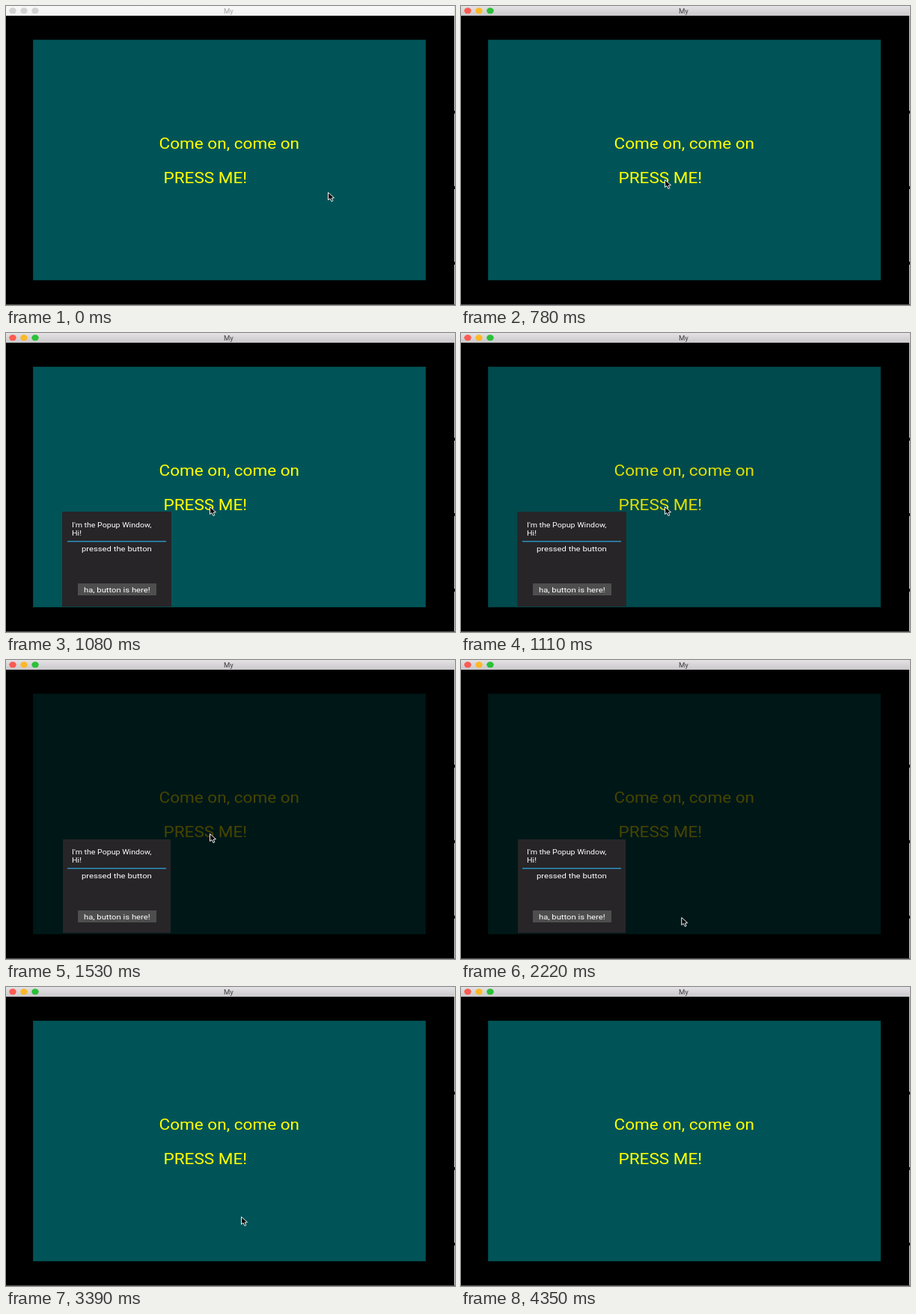
Recreate the animation shown at these times as an HTML page with a canvas. Size 600 by 400 pixels, loop 4.53 s.

```html
<!DOCTYPE html>
<html>
<head>
<meta charset="utf-8">
<title>Popup demo</title>
<style>
  html, body { margin: 0; width: 100%; height: 100%; overflow: hidden; background: #000; }
  canvas { display: block; }
</style>
</head>
<body>
<canvas id="stage" width="600" height="400"></canvas>
<script>
const ctx = document.getElementById('stage').getContext('2d');
const LOOP = 4530, TICK = 30;
const FOCUS = 90, OPEN = 1080, CLOSE = 3330, CLOSED = 3390, HIDE = 4350;
const FADE_IN = 180, FADE_OUT = CLOSED - CLOSE;
const WIDEN = 1.14; // the window is shown wider than it is tall

const START = { x: 430, y: 249 };
const MOVES = [
  { from: 30, to: 780, x: 272, y: 232 },   // onto the big button
  { from: 1530, to: 2040, x: 329, y: 343 },
  { from: 2100, to: 2460, x: 195, y: 347 }, // onto the popup's button
  { from: 3030, to: 3180, x: 314, y: 307 },
  { from: 3630, to: 3780, x: 380, y: 224 },
  { from: 3930, to: 4320, x: 475, y: 14 }
];
const ARROW = new Path2D('M0 0V10L2.5 8L4.5 12L6.3 11.2L4.7 7.5L8 7.2Z');

const clamp = v => Math.max(0, Math.min(1, v));
const lerp = (a, b, k) => a + (b - a) * k;
const ease = u => u * u * (3 - 2 * u);

function rect(x, y, w, h, color) {
  ctx.fillStyle = color;
  ctx.fillRect(x, y, w, h);
}

function text(str, x, y, size, color) {
  ctx.save();
  ctx.translate(x, y);
  ctx.scale(WIDEN, 1);
  ctx.font = `${size}px Roboto, sans-serif`;
  ctx.fillStyle = color;
  ctx.fillText(str, 0, 0);
  ctx.restore();
}

function titleBar(active) {
  const shade = ctx.createLinearGradient(0, 0, 0, 13);
  shade.addColorStop(0, active ? '#e4e2e4' : '#f8f8f8');
  shade.addColorStop(1, active ? '#cac8ca' : '#f2f2f2');
  rect(0, 0, 599, 13, shade);
  ['#fc5b51', '#fcb827', '#2ac138'].forEach((color, i) => {
    ctx.fillStyle = active ? color : '#d2d2d2';
    ctx.beginPath();
    ctx.ellipse(9 + 15 * i, 6.3, 4.7, 4, 0, 0, 7);
    ctx.fill();
  });
  text('My', 291, 10, 8.4, active ? '#444' : '#a8a8a8');
}

function desktopEdge() {
  rect(599, 0, 1, 400, '#dcdcdc');
  for (let y = 140; y < 400; y += 101) rect(599, y, 1, 4, '#222');
  rect(0, 399, 600, 1, '#555');
}

function panel(dim) {
  const light = 1 - 0.73 * dim;
  const shaded = (...rgb) => `rgb(${rgb.map(v => Math.round(v * light))})`;
  rect(36, 45, 525, 322, shaded(0, 70, 72));
  rect(37, 46, 523, 320, shaded(0, 84, 88));
  text('Come on, come on', 204.5, 190.6, 19.8, shaded(255, 255, 0));
  text('PRESS ME!', 210.5, 236.6, 19.8, shaded(255, 255, 0));
}

function popup(dim, pressed) {
  const grow = 1 - dim;
  rect(76 - grow, 240 - grow, 144 + 2 * grow, 125 + 2 * grow, '#272528');
  text("I'm the Popup Window,", 88, 260, 9.3, '#fff');
  text('Hi!', 88, 271, 9.3, '#fff');
  rect(82, 278, 132, 1.5, '#2f8fc0');
  text('pressed the button', 101, 292, 9.9, '#fff');
  rect(96, 335, 105, 16, pressed ? '#2f8fb4' : '#4e4e4e');
  text('ha, button is here!', 104, 347, 9.9, '#fff');
}

function cursor(t) {
  let { x, y } = START;
  for (const move of MOVES) {
    const k = ease(clamp((t - move.from) / (move.to - move.from)));
    x = lerp(x, move.x, k);
    y = lerp(y, move.y, k);
  }
  ctx.save();
  ctx.translate(x + 0.5, y + 0.5);
  ctx.fillStyle = '#080808';
  ctx.fill(ARROW);
  ctx.strokeStyle = '#f4f4f4';
  ctx.stroke(ARROW);
  ctx.restore();
}

function draw(t) {
  const dim = clamp((t - OPEN) / FADE_IN) * clamp((CLOSED - t) / FADE_OUT);
  rect(0, 0, 600, 400, '#000');
  titleBar(t >= FOCUS);
  desktopEdge();
  panel(dim);
  if (t >= OPEN && t < CLOSED) popup(dim, t >= 2730 && t < 2850);
  if (t < HIDE) cursor(t);
}

const start = performance.now();
function frame() {
  const t = (performance.now() - start) % LOOP;
  draw(Math.floor(t / TICK) * TICK);
  requestAnimationFrame(frame);
}
frame();
</script>
</body>
</html>
```
